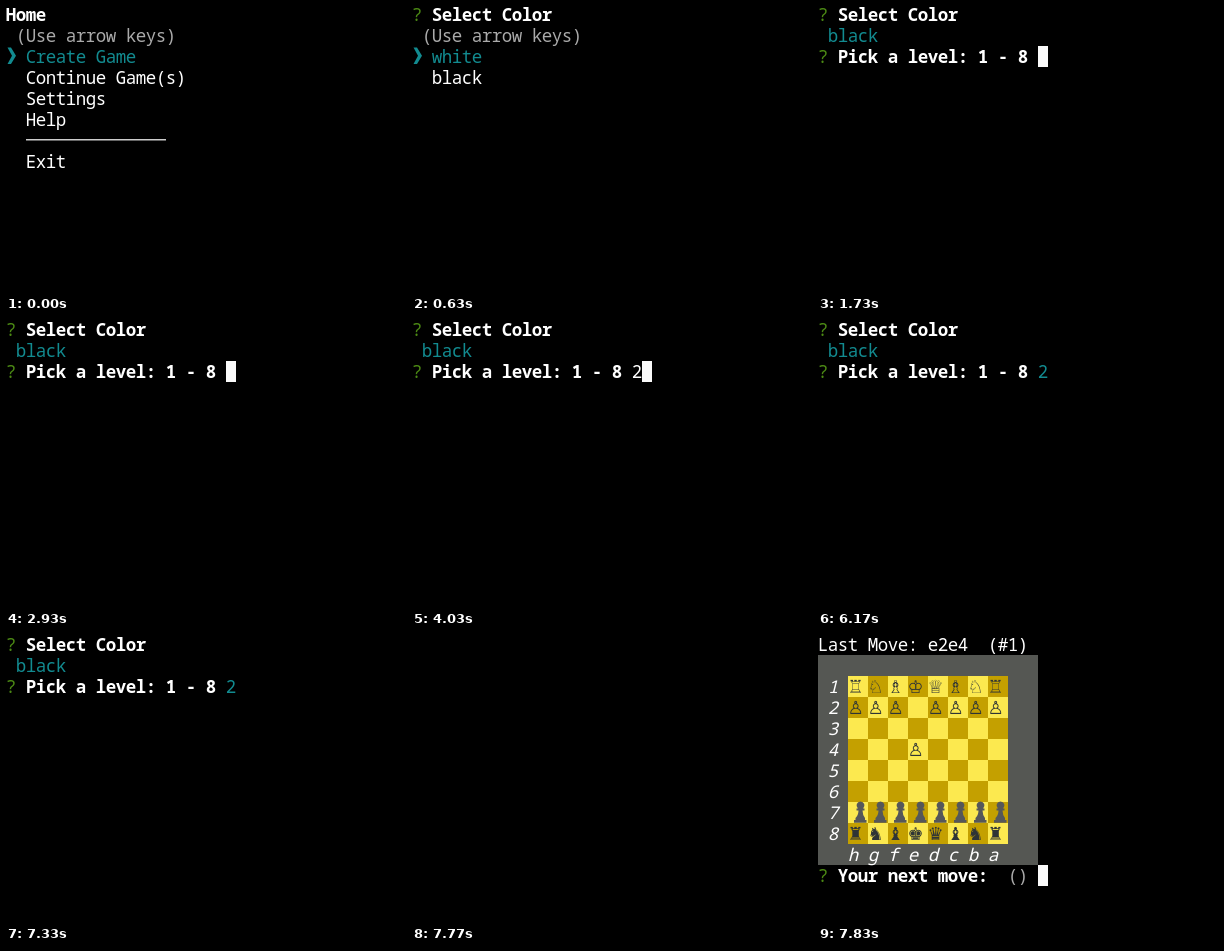
An HTML page for the animation above (8 s loop, 400 by 287 pixels).

```html
<!DOCTYPE html>
<html lang="en">
<head>
<meta charset="utf-8">
<title>Terminal chess</title>
<style>
  html, body { margin: 0; width: 100%; height: 100%; overflow: hidden; background: #000; }
  svg { display: block; width: 100%; height: 100%; }
  text {
    white-space: pre; fill: #fff; letter-spacing: -0.5px;
    font: 17.5px "Noto Sans Mono", "DejaVu Sans Mono", monospace;
  }
  .bold { font-weight: 700; }
  .dim { fill: #aaa; }
  .cyan { fill: #128b90; }
  .green { fill: #4c8a14; }
  .label { font-style: italic; }
  .piece { font: 18px "DejaVu Sans", sans-serif; letter-spacing: 0; fill: #2e3436; text-anchor: middle; }
</style>
</head>
<body>
<svg id="stage" viewBox="0 0 400 287"></svg>
<script>
const LOOP = 8000, COL = 10, ROW = 21;
const stage = document.getElementById('stage');

// Character-cell helpers: column and row give the position.
const rowTop = row => row * ROW - 2;
const put = (col, row, str, cls = '') =>
  `<text class="${cls}" x="${col * COL - 0.25}" y="${row * ROW + 15}">${str}</text>`;
const rect = (x, y, w, h, fill) =>
  `<rect x="${x}" y="${y}" width="${w}" height="${h}" fill="${fill}" shape-rendering="crispEdges"/>`;
const cursor = (col, row) => rect(col * COL, rowTop(row), COL, ROW, '#fafafa');
const pointer = row =>
  `<path class="cyan" transform="translate(0 ${rowTop(row)})" d="M1.5 1.5H5L10 9.7L5 18H1.5L6 9.7Z"/>`;
const ask = (row, str) => put(0, row, '?', 'green') + put(2, row, str, 'bold');
const hint = () => put(1, 1, '(Use arrow keys)', 'dim');

function homeMenu() {
  return put(0, 0, 'Home', 'bold') + hint() + pointer(2) +
    put(2, 2, 'Create Game', 'cyan') +
    ['Continue Game(s)', 'Settings', 'Help'].map((s, i) => put(2, i + 3, s)).join('') +
    '<rect x="20" y="133" width="140" height="1.5" fill="#ccc"/>' +
    put(2, 7, 'Exit');
}

function colorMenu(picked) {
  return ask(0, 'Select Color') + (picked ? '' : hint()) + pointer(2 + picked) +
    ['white', 'black'].map((s, i) => put(2, i + 2, s, i === picked ? 'cyan' : '')).join('');
}

function levelPrompt(answer = '', cls = '') {
  return ask(0, 'Select Color') + put(1, 1, 'black', 'cyan') +
    ask(2, 'Pick a level: 1 - 8') + put(22, 2, answer, cls);
}

const PAWN = 'M12.5 0a4 4 0 0 1 2.6 7h1.4v2h-2q.2 5 2.5 7.5v2h1.5v2.8H6v-2.8h1.5v-2' +
  'Q10.3 14 10.5 9h-2V7h1.4A4 4 0 0 1 12.5 0Z';

function board() {
  let out = rect(0, 19, 220, 210, '#555753');
  const ranks = { 0: '♖♘♗♔♕♗♘♖', 1: '♙♙♙ ♙♙♙♙', 3: '   ♙    ', 7: '♜♞♝♚♛♝♞♜' };
  for (let r = 0; r < 8; r++) {
    const y = rowTop(r + 2);
    out += put(1, r + 2, r + 1, 'label') + put(3 + 2 * r, 10, 'hgfedcba'[r], 'label');
    for (let c = 0; c < 8; c++) {
      out += rect(30 + 20 * c, y, 20, ROW, (r + c) % 2 ? '#c4a000' : '#fce94f');
    }
    for (let c = 0; c < 8; c++) {
      const x = 30 + 20 * c;
      if (r === 6) out += `<path transform="translate(${x} ${y - 0.5})" fill="#55575a" d="${PAWN}"/>`;
      const piece = ranks[r]?.[c] ?? ' ';
      if (piece !== ' ') out += `<text class="piece" x="${x + 7.5}" y="${y + 17}">${piece}</text>`;
    }
  }
  return out;
}

function game() {
  return put(0, 0, 'Last Move: e2e4  (#1)') + board() +
    ask(11, 'Your next move:') + put(19, 11, '()', 'dim') + cursor(22, 11);
}

// Each scene holds from its start time until the next one.
const scenes = [
  [0, homeMenu()],
  [630, colorMenu(0)],
  [1270, colorMenu(1)],
  [1730, levelPrompt() + cursor(22, 2)],
  [2330, levelPrompt()],
  [2930, levelPrompt() + cursor(22, 2)],
  [3530, levelPrompt()],
  [4000, levelPrompt() + cursor(22, 2)],
  [4030, levelPrompt('2') + cursor(23, 2)],
  [4600, levelPrompt('2')],
  [5200, levelPrompt('2') + cursor(23, 2)],
  [5630, levelPrompt('2', 'cyan') + cursor(0, 3)],
  [6170, levelPrompt('2', 'cyan')],
  [6770, levelPrompt('2', 'cyan') + cursor(0, 3)],
  [7330, levelPrompt('2', 'cyan')],
  [7700, cursor(0, 0)],
  [7770, ''],
  [7830, game()]
];

let shown = -1;
function draw() {
  const t = performance.now() % LOOP;
  const now = scenes.findLastIndex(([start]) => start <= t);
  if (now !== shown) {
    stage.innerHTML = rect(0, 0, 400, 287, '#000') + scenes[now][1];
    shown = now;
  }
  requestAnimationFrame(draw);
}
draw();
</script>
</body>
</html>
```
